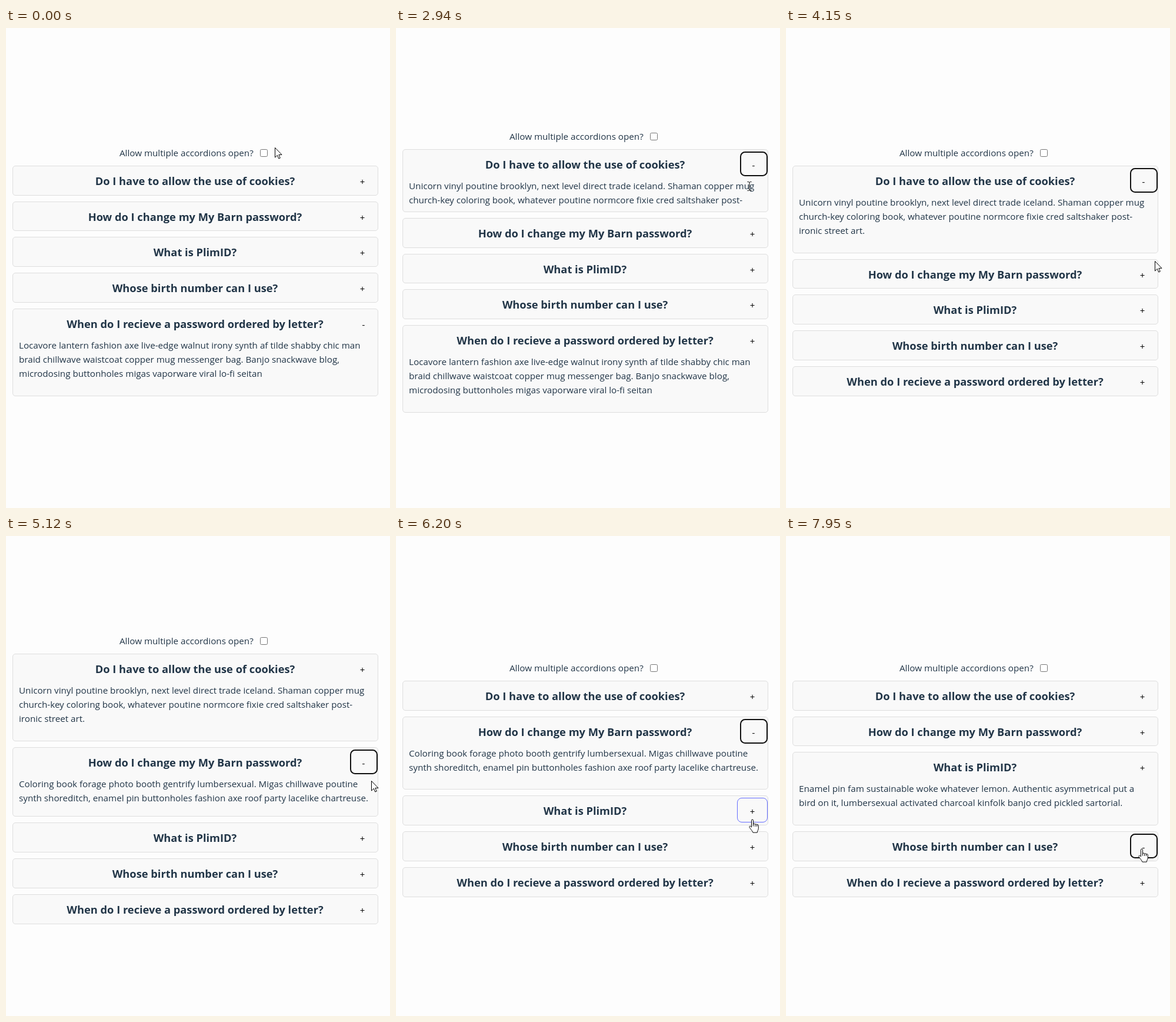
Recreate the animation shown at these times as an HTML page. Size 653x816 px, loop 8000 ms.

```html
<!DOCTYPE html>
<html lang="en">
<head>
<meta charset="utf-8">
<title>Accordion</title>
<style>
  html, body { margin: 0; width: 100%; height: 100%; overflow: hidden; background: #fdfdfd; }
  #stage { display: block; width: 100%; height: 100%; }
  text { font-family: "Open Sans", "Noto Sans", sans-serif; font-size: 15.2px; fill: #213547; white-space: pre; }
  .title { font-size: 18.27px; font-weight: 700; text-anchor: middle; }
  .sign { font-size: 15px; font-weight: 500; text-anchor: middle; fill: #000; }
  .card { fill: #f9f9f9; stroke: #dedede; }
  .hover { fill: #f9f9f9; stroke: #646cff; }
  .focus { fill: #f9f9f9; stroke: #101010; stroke-width: 2; }
  .box { fill: #fff; stroke: #767676; }
  .pointer { fill: #fff; stroke: #000; stroke-linejoin: round; }
</style>
</head>
<body>
<svg id="stage" viewBox="0 0 653 816"></svg>
<script>
const LOOP = 8000;
const HEAD = 50.7, GAP = 10, MIDDLE = 429.75, MAX = 300;

const items = [
  ["Do I have to allow the use of cookies?",
    "Unicorn vinyl poutine brooklyn, next level direct trade iceland. Shaman copper mug",
    "church-key coloring book, whatever poutine normcore fixie cred saltshaker post-",
    "ironic street art."],
  ["How do I change my My Barn password?",
    "Coloring book forage photo booth gentrify lumbersexual. Migas chillwave poutine",
    "synth shoreditch, enamel pin buttonholes fashion axe roof party lacelike chartreuse."],
  ["What is PlimID?",
    "Enamel pin fam sustainable woke whatever lemon. Authentic asymmetrical put a",
    "bird on it, lumbersexual activated charcoal kinfolk banjo cred pickled sartorial."],
  ["Whose birth number can I use?"],
  ["When do I recieve a password ordered by letter?",
    "Locavore lantern fashion axe live-edge walnut irony synth af tilde shabby chic man",
    "braid chillwave waistcoat copper mug messenger bag. Banjo snackwave blog,",
    "microdosing buttonholes migas vaporware viral lo-fi seitan"]
];

const clicks = [
  { at: 2832, start: 2832, dur: 720, open: 0, close: 4 },
  { at: 4959, start: 4959, dur: 955, open: 1, close: 0 },
  { at: 6401, start: 6401, dur: 950, open: 2, close: 1 },
  { at: 7940, start: 8000, dur: 950, open: 3, close: 2 }
];

// Pointer hotspot: time, x, y
const path = [
  [80, 457, 203], [380, 606, 497], [480, 606, 499], [850, 430, 199],
  [980, 430, 199], [1780, 574, 243], [1880, 574, 243], [2600, 601, 269],
  [2960, 601, 269], [3510, 606, 300], [4150, 627, 396], [4380, 627, 396],
  [4550, 619, 414], [5120, 621, 416], [5510, 615, 440], [6040, 606, 482],
  [6750, 606, 484], [7080, 607, 511], [7530, 606, 520], [7760, 606, 520],
  [7900, 605, 532]
];

const pointers = {
  arrow: "M.5.5V17L4.4 13.3L6.8 19L9.3 18L6.9 12.4H12Z",
  hand: "M-1.5 1.5a1.5 1.5 0 0 1 3 0V8c.3-1.3 3-1.2 3.2.4c.4-1 2.9-.8 3 .7c.4-.9 2.6-.6 2.6 1v5c0 3-2 4-2 7H1" +
    "C0 19-3.5 16-4.8 13.4c-1-2 1-3 2.2-1.4L-1.5 13ZM1.5 8V11.5M4.7 8.5V12M7.7 9V12",
  beam: "M-3.5-7.5H-1.5L0-6.5L1.5-7.5H3.5M0-6.5V6.5M-3.5 7.5H-1.5L0 6.5L1.5 7.5H3.5"
};

const stage = document.getElementById("stage");

function add(parent, tag, attrs, content) {
  const el = document.createElementNS("http://www.w3.org/2000/svg", tag);
  set(el, attrs);
  if (content) el.textContent = content;
  parent.appendChild(el);
  return el;
}

function set(el, attrs) {
  for (const key in attrs) el.setAttribute(key, attrs[key]);
}

function show(el, on) {
  el.style.display = on ? "" : "none";
}

const label = add(stage, "g", {});
add(label, "text", { x: 193, y: -16 }, "Allow multiple accordions open?");
add(label, "rect", { class: "box", x: 432.5, y: -27.5, width: 12, height: 12, rx: 2 });

const cards = items.map(([title, ...lines]) => {
  const group = add(stage, "g", {});
  const frame = add(group, "rect", { class: "card", x: 11.5, y: 0.5, width: 621, rx: 4.5 });
  add(group, "text", { class: "title", x: 321.5, y: 33 }, title);
  const panel = add(group, "svg", { x: 0, y: 41, width: 653, height: 0 });
  const rows = lines.map((line, k) => add(panel, "text", { x: 22, y: 27 + 24 * k }, line));
  const hover = add(group, "rect", { class: "hover", x: 580.5, y: 4.5, width: 51, height: 41, rx: 7.5 });
  const focus = add(group, "rect", { class: "focus", x: 586, y: 5, width: 45, height: 40, rx: 7.5 });
  const sign = add(group, "text", { class: "sign", y: 32.5 });
  return { group, frame, panel, rows, hover, focus, sign, full: 26 + 24 * lines.length };
});

const pointer = add(stage, "path", { class: "pointer" });

// cubic-bezier(.25, .1, .25, 1)
function ease(x) {
  if (x <= 0) return 0;
  if (x >= 1) return 1;
  let lo = 0, hi = 1;
  for (let i = 0; i < 24; i++) {
    const s = (lo + hi) / 2;
    if (0.75 * s * (1 - s) + s * s * s < x) lo = s; else hi = s;
  }
  return 0.3 * lo * (1 - lo) ** 2 + 3 * lo * lo * (1 - lo) + lo ** 3;
}

function pointerAt(t) {
  const next = path.findIndex(key => key[0] > t);
  if (next === 0) return path[0].slice(1);
  if (next < 0) return path[path.length - 1].slice(1);
  const [t0, x0, y0] = path[next - 1], [t1, x1, y1] = path[next];
  const u = (t - t0) / (t1 - t0), k = u * u * (3 - 2 * u);
  return [Math.round(x0 + (x1 - x0) * k), Math.round(y0 + (y1 - y0) * k)];
}

function stateAt(t) {
  const extra = cards.map((card, i) => i === 4 ? card.full : 0);
  let open = 4, focus = -1;
  for (const c of clicks) {
    if (t < c.at) break;
    const p = ease((t - c.start) / c.dur);
    extra[c.open] = Math.min(cards[c.open].full, MAX * p);
    extra[c.close] = Math.min(cards[c.close].full, MAX * (1 - p));
    open = focus = c.open;
  }
  return { extra, open, focus };
}

function draw(t) {
  const { extra, open, focus } = stateAt(t);
  const [px, py] = pointerAt(t);
  const total = extra.reduce((a, b) => a + b, HEAD * 5 + GAP * 4);
  let y = MIDDLE - total / 2;
  let kind = "arrow";

  set(label, { transform: `translate(0 ${Math.round(y)})` });
  cards.forEach((card, i) => {
    const top = Math.round(y), bottom = Math.round(y + HEAD + extra[i]);
    const left = i === open ? 585 : 580;
    const over = px >= left && px < 632 && py >= top + 4 && py < top + 46;

    set(card.group, { transform: `translate(0 ${top})` });
    set(card.frame, { height: bottom - top - 1 });
    set(card.panel, { height: extra[i] });
    show(card.hover, over && i !== focus);
    show(card.focus, i === focus);
    card.sign.textContent = i === open ? "-" : "+";
    set(card.sign, { x: i === open ? 608 : 606 });

    if (over) kind = "hand";
    const row = card.rows[Math.floor((py - top - 50) / 24)];
    if (row && py < bottom - 10 && px >= 22 && px < 22 + row.getComputedTextLength()) kind = "beam";
    y += HEAD + extra[i] + GAP;
  });
  set(pointer, { d: pointers[kind], transform: `translate(${px} ${py})` });
}

const begin = performance.now();
function tick() {
  draw((performance.now() - begin) % LOOP);
  requestAnimationFrame(tick);
}
tick();
</script>
</body>
</html>
```
